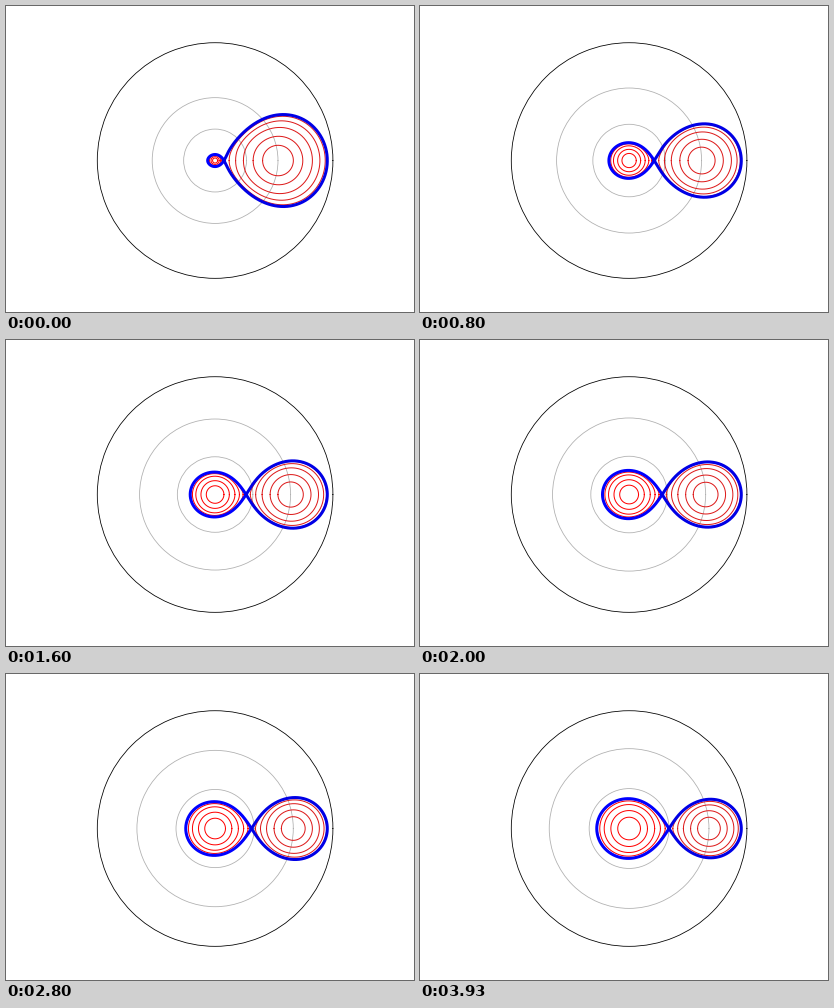
A matplotlib script that plays this animation: 408 by 306 pixels, repeating every 3.99 s.

```python
import numpy as np
import matplotlib.pyplot as plt
from matplotlib.animation import FuncAnimation

W, H, DPI = 408, 306, 72
FRAMES, LOOP_MS = 60, 3990
RATIOS = np.linspace(0.01, 1, FRAMES)
STEPS = np.array([0.285, 0.46, 0.64, 0.785, 0.905, 1.0])  # share of the way to L1
PHI = np.linspace(0, 2 * np.pi, 361)
RIM = 1.05


def potential(x, y, q):
    """Roche potential: mass q at the origin, unit mass at (1, 0)."""
    spin = (1 + q) / 2 * ((x - 1 / (1 + q)) ** 2 + y ** 2)
    return -q / np.hypot(x, y) - 1 / np.hypot(x - 1, y) - spin


def bisect(rising, lo, hi, steps=45):
    for _ in range(steps):
        mid = (lo + hi) / 2
        below = rising(mid) < 0
        lo, hi = np.where(below, mid, lo), np.where(below, hi, mid)
    return (lo + hi) / 2


def inner_point(q):
    def slope(x):
        return 1 / (1 - x) ** 2 - q / x ** 2 + (1 + q) * x - 1
    return float(bisect(slope, 1e-6, 1 - 1e-6))


def equipotentials(q, center, side, reach):
    """Radii of closed curves round one star, the last being its Roche lobe."""
    levels = potential(center + side * reach * STEPS, 0, q)[:, None]
    c, s = side * np.cos(PHI), np.sin(PHI)

    def excess(r):
        return potential(center + r * c, r * s, q) - levels

    shape = (len(STEPS), len(PHI))
    return bisect(excess, np.full(shape, 1e-7), np.full(shape, reach))


def seen_from_origin(r):
    """Polar coordinates of curves round (1, 0); the angle is taken as its sine."""
    x, y = 1 - r * np.cos(PHI), r * np.sin(PHI)
    dist = np.hypot(x, y)
    return y / dist, dist


fig = plt.figure(figsize=(W / DPI, H / DPI), dpi=DPI, facecolor="white")
ax = fig.add_subplot(projection="polar")
ax.set_ylim(0, RIM)
ax.set_xticks([])


def star(red, blue):
    styles = [(red, 1)] * (len(STEPS) - 1) + [(blue, 3)]
    return [ax.plot([], [], color=color, lw=width, zorder=1 + width)[0]
            for color, width in styles]


small = star("red", "blue")
large = star("#dd1a1a", "#0000e6")


def update(i):
    q = RATIOS[i]
    l1 = inner_point(q)
    r_small = equipotentials(q, 0, 1, l1)
    angle, dist = seen_from_origin(equipotentials(q, 1, -1, 1 - l1))
    scale = 1 / dist.max()  # the far edge of the large lobe stays put
    for line, r in zip(small, r_small):
        line.set_data(PHI, scale * r)
    for line, a, r in zip(large, angle, dist):
        line.set_data(a, scale * r)
    ax.set_yticks([scale / 2, scale], labels=["", ""])
    return small + large


anim = FuncAnimation(fig, update, frames=FRAMES, interval=LOOP_MS / FRAMES,
                     repeat=True, repeat_delay=0)
plt.show()
```
